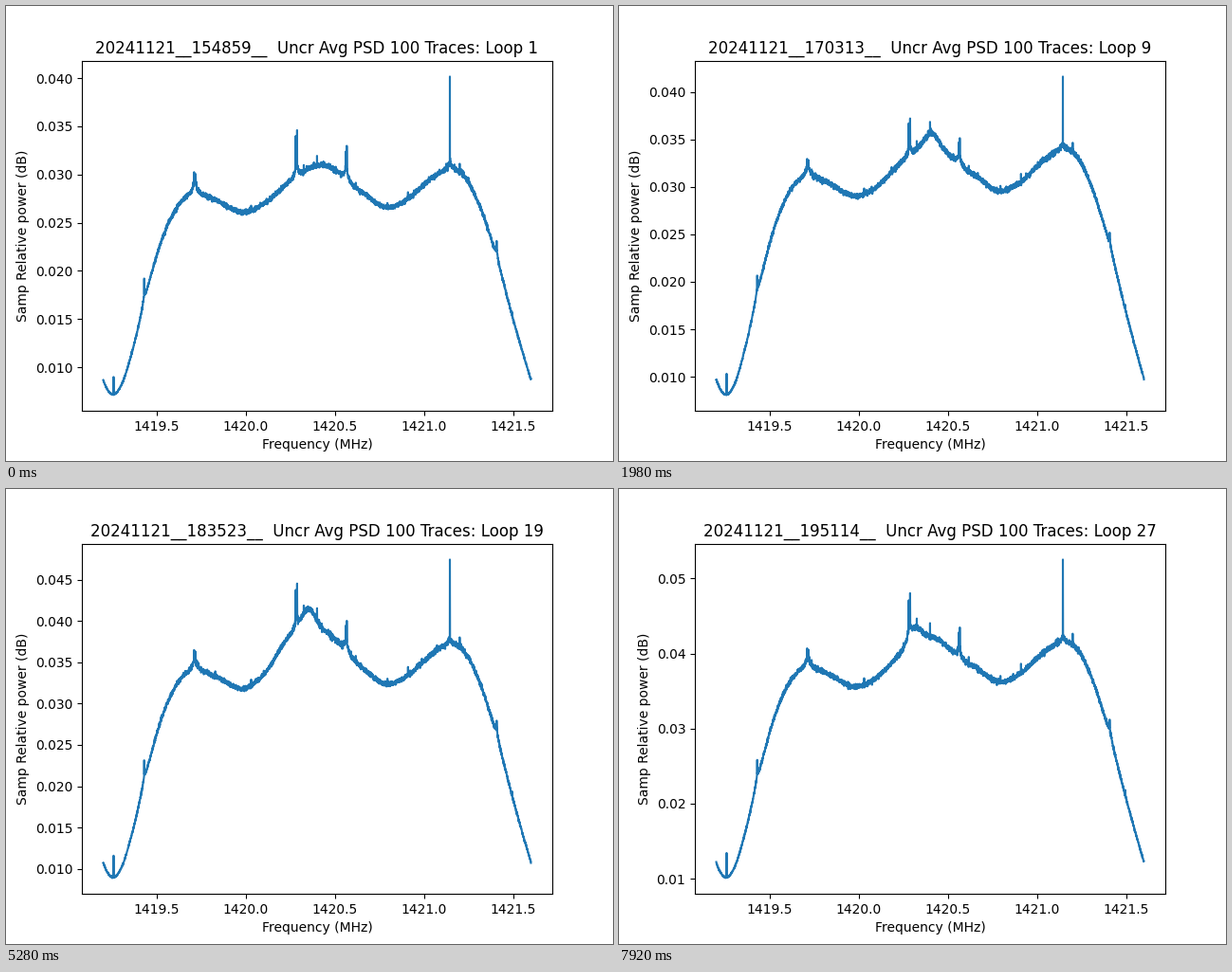
These frames come from a looping animation (640x480 px, 8 s). A matplotlib script:

```python
import numpy as np
import matplotlib.pyplot as plt
from matplotlib.animation import FuncAnimation

STEP = 330        # ms each trace stays on screen
TICK = 40         # ms per animation frame
LOOP_MS = 8000
POINTS = 4096
NOISE = .0045     # relative to the power

# Recorded loops; 7 and 8 are missing
LOOPS = [k for k in range(1, 28) if k not in (7, 8)]

# Passband key points: MHz above 1419, power in thousandths
BAND = np.array([
    (.2, 8.67), (.257, 7.2), (.3, 8.1), (.36, 11.5), (.45, 18.3),
    (.53, 23.3), (.61, 26.5), (.7, 28.1), (.8, 27.6), (1.0, 26.12),
    (1.1, 26.95), (1.25, 29.3), (1.43, 31.0), (1.65, 28.2), (1.79, 26.6),
    (1.9, 27.35), (2.05, 29.7), (2.15, 30.6), (2.22, 30.0), (2.3, 27.3),
    (2.4, 21.9), (2.5, 15.0), (2.6, 8.72)])

# Loop number, gain, interference strength, shoulder, time of day in s
KEYS = np.array([
    (1, 1.0, 1.0, 0, 56939),
    (5, 1.07, 1.155, -.4, 59226),
    (11, 1.123, .62, -.5, 62477),
    (15, 1.198, .765, -.6, 64663),
    (19, 1.205, 1.07, .4, 66923),
    (22, 1.2285, 1.237, -.4, 68618),
    (25, 1.275, 1.13, -.5, 70332),
    (27, 1.342, 1.144, -.7, 71474)]).T

# Place and height of spikes that vary with the interference
STRONG = [(.43, 2.4), (.71, 2.1), (.718, 1.9), (1.28, 4.3), (1.288, 4.8),
          (1.56, 2.8), (1.567, 3.5), (2.145, 9.56), (2.408, 1.7)]
# Spikes that only follow the gain
STEADY = [(.258, 1.8), (.735, .5), (1.03, .5), (1.325, .7), (1.4, 1.0),
          (1.617, .5), (1.795, .45), (1.91, .7), (2.2, .8), (2.495, .4)]

freq = np.linspace(.2, 2.6, POINTS)


def hermite(x, px, py):
    m = np.gradient(py, px, edge_order=2)
    i = np.clip(np.searchsorted(px, x) - 1, 0, len(px) - 2)
    h = px[i + 1] - px[i]
    t = (x - px[i]) / h
    u = 1 - t
    return (u * u * ((1 + 2 * t) * py[i] + t * h * m[i])
            + t * t * ((3 - 2 * t) * py[i + 1] - u * h * m[i + 1]))


def bell(x, center, width):
    return np.exp(-((x - center) / width) ** 2 / 2)


def smooth(t):
    t = np.clip(t, 0, 1)
    return t * t * (3 - 2 * t)


band = hermite(freq, *BAND.T)


def trace(loop):
    gain, rfi, shoulder, _ = (np.interp(loop, KEYS[0], row) for row in KEYS[1:])
    level = gain * band + 1.55 * (gain - 1)

    # hydrogen line: a narrow peak drifting down and a broad passing wing
    level += 2 * smooth((loop - 1) / 14) * bell(freq, 1.452 - .0052 * loop, .036)
    level += 2.8 * bell(loop, 18.5, 4.4) * bell(freq, 1.28, .11)
    level += shoulder * bell(freq, 1.53, .07)

    y = level.copy()
    for f, _ in STRONG:
        y += .8 * rfi * np.exp(-np.abs(freq - f) / .009)
    y *= 1 + NOISE * np.random.default_rng(loop).standard_normal(POINTS)

    for spikes, scale in ((STRONG, rfi), (STEADY, gain ** 2)):
        for f, height in spikes:
            k = np.abs(freq - f).argmin()
            y[k] = max(y[k], level[k] + scale * height)
    return y / 1000


def title(loop):
    sec = int(round(np.interp(loop, KEYS[0], KEYS[4])))
    stamp = f"{sec // 3600:02d}{sec // 60 % 60:02d}{sec % 60:02d}"
    return f"20241121__{stamp}__  Uncr Avg PSD 100 Traces: Loop {loop}"


traces = [trace(loop) for loop in LOOPS]

fig, ax = plt.subplots(figsize=(6.4, 4.8), dpi=100)
line, = ax.plot(1419 + freq, traces[0])
ax.ticklabel_format(axis="x", useOffset=False)
ax.set_xlabel("Frequency (MHz)")
ax.set_ylabel("Samp Relative power (dB)")
heading = ax.set_title(title(LOOPS[0]))


def update(i):
    n = (i * TICK + TICK - 1) // STEP
    y = traces[n]
    pad = .05 * (y.max() - y.min())
    line.set_ydata(y)
    ax.set_ylim(y.min() - pad, y.max() + pad)
    heading.set_text(title(LOOPS[n]))
    return line, heading


anim = FuncAnimation(fig, update, frames=LOOP_MS // TICK, interval=TICK,
                     repeat=True, repeat_delay=0, blit=False)
plt.show()
```
